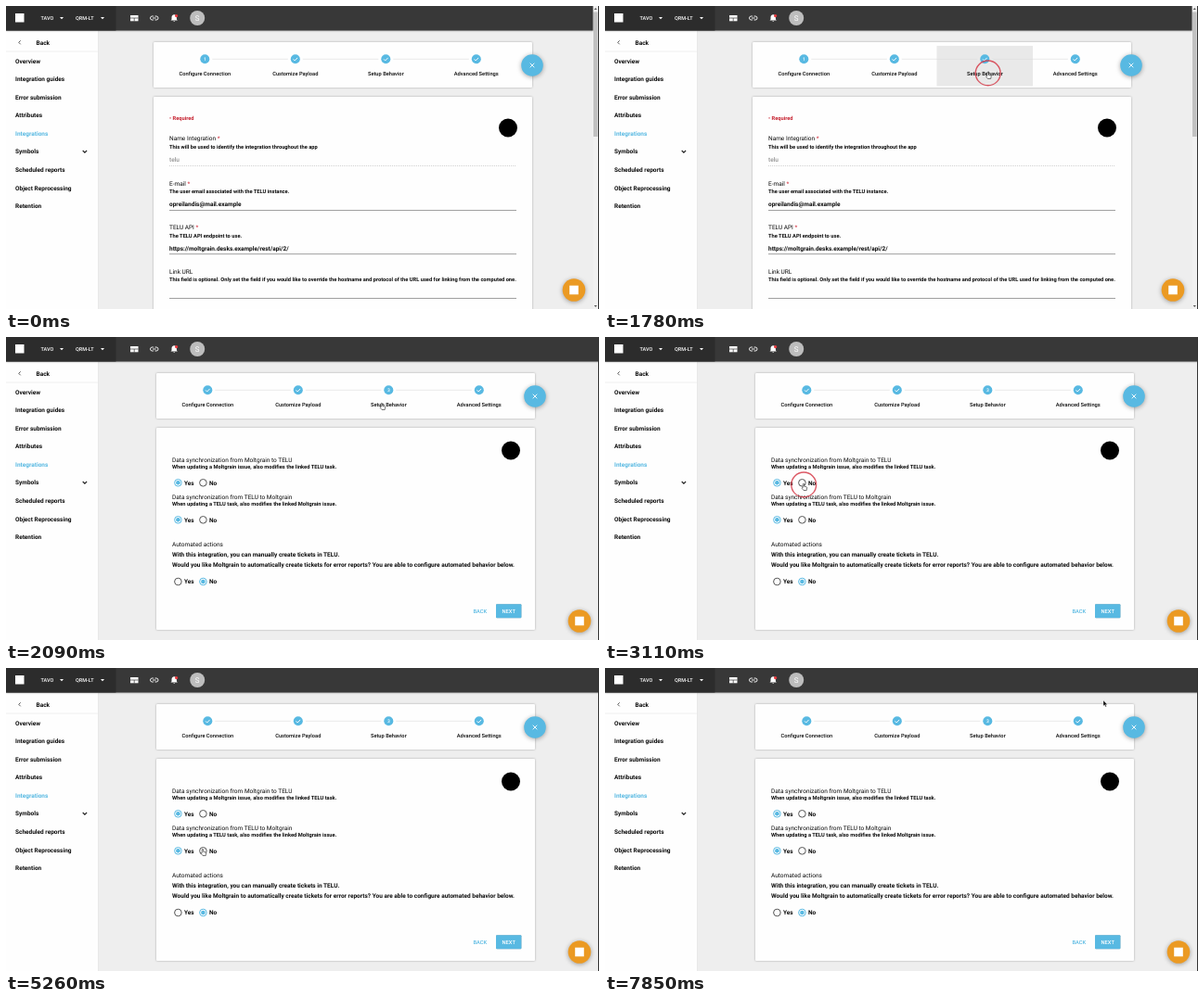
An HTML page for the animation above (8 s loop, 639 by 327 pixels).

```html
<!DOCTYPE html>
<html lang="en">
<head>
<meta charset="utf-8">
<title>Integration settings</title>
<style>
  html, body { margin: 0; width: 100%; height: 100%; overflow: hidden; background: #eee; }
  svg { display: block; width: 100%; height: 100%; }
  text { font-family: Roboto, Arial, sans-serif; font-size: 6.5px; fill: #0c0c0c; text-rendering: geometricPrecision; }
  .b { font-weight: 700; }
  .m { font-weight: 500; }
  .s { font-size: 5.72px; }
  .card { fill: #fefefe; filter: drop-shadow(0 .6px 1.2px rgba(0, 0, 0, .3)); }
  .float { filter: drop-shadow(0 1.2px 2.6px rgba(0, 0, 0, .35)); }
</style>
</head>
<body>
<svg id="stage" viewBox="0 0 639 327" xmlns="http://www.w3.org/2000/svg"></svg>
<script>
const LOOP = 8000;
const BLUE = '#58b9e2', RED = '#d3303f';

const text = (x, y, s, cls = '', extra = '') => `<text x="${x}" y="${y}" class="${cls}" ${extra}>${s}</text>`;
const rect = (x, y, w, h, fill, extra = '') => `<rect x="${x}" y="${y}" width="${w}" height="${h}" fill="${fill}" ${extra}/>`;
const disc = (x, y, r, fill, extra = '') => `<circle cx="${x}" cy="${y}" r="${r}" fill="${fill}" ${extra}/>`;
const line = (d, color, w = 1, extra = '') => `<path d="${d}" fill="none" stroke="${color}" stroke-width="${w}" ${extra}/>`;
const mid = 'text-anchor="middle"';

function header() {
  const caret = x => `<path d="M${x - 2} 12h4l-2 2.3z" fill="#fff"/>`;
  return rect(0, 0, 639, 26.5, '#383838', 'style="filter:drop-shadow(0 .5px .8px rgba(0,0,0,.4))"') +
    rect(0, 0, 118.5, 26.5, '#2c2c2c') +
    rect(10, 8, 9.5, 9.5, '#fff') +
    text(37.5, 15, 'TAVO', 'm', 'style="font-size:5.5px;fill:#fff"') + caret(60) +
    text(75, 15, 'QRM-LT', 'm', 'style="font-size:5.5px;fill:#fff"') + caret(104) +
    rect(134, 10, 8.5, 6.3, '#fff') + line('M134 13h8.5M138.2 13v3.5', '#383838', .7) +
    line('M159 11h-1.5a2 2 0 0 0 0 4h1.5M160.5 11h1.5a2 2 0 0 1 0 4h-1.5M158 13h3.6', '#fff', .9) +
    '<path d="M177.5 15.6l1-1v-2.4q0-2.6 2.7-2.9q2.7.3 2.7 2.9v2.4l1 1zM180.2 16.2h2q-1 1.6-2 0z" fill="#fff"/>' +
    disc(183.6, 10.6, 1.6, '#e8383d') +
    disc(206.2, 13, 8, '#bdbdbd') + text(206.2, 15.9, 'S', '', mid + ' style="font-size:8px;fill:#fff"');
}

function sidebar() {
  const items = ['Overview', 'Integration guides', 'Error submission', 'Attributes', 'Integrations',
    'Symbols', 'Scheduled reports', 'Object Reprocessing', 'Retention'];
  return rect(0, 26, 99, 301, '#fefefe') + rect(99, 26, .5, 301, '#e2e2e2') + rect(0, 48.8, 99, .5, '#e2e2e2') +
    line('M15.7 37.3l-2 2 2 2', '#333', .8) + text(32.5, 41.6, 'Back', 'b') +
    items.map((s, i) => text(10, 61.5 + i * 19.58, s, 'b', i === 4 ? `style="fill:${BLUE}"` : '')).join('') +
    line('M82.7 156l2.2 2.2 2.2-2.2', '#222', 1.1);
}

function stepper() {
  const labels = ['Configure Connection', 'Customize Payload', 'Setup Behavior', 'Advanced Settings'];
  let out = '<rect class="card" x="159" y="39" width="408" height="49" rx="1"/>' +
    '<clipPath id="tab"><rect x="357.5" y="43" width="103.5" height="43.5"/></clipPath>' +
    '<circle id="ripple" cx="411.5" cy="72" fill="#e9e9e9" clip-path="url(#tab)"/>';
  labels.forEach((s, i) => {
    const x = 214.3 + i * 97.5;
    if (i < 3) out += line(`M${x + 8} 57.3h81.5`, '#d8d8d8', .6);
    out += disc(x, 57.3, 5, BLUE) +
      `<g id="check${i}">${line(`M${x - 2.2} 57.4l1.6 1.6 2.9-3.1`, '#fff', .9)}</g>` +
      text(x, 59.1, i + 1, 'm', `id="num${i}" ${mid} style="font-size:5px;fill:#fff"`) +
      text(x, 74.7, s, 'm s', mid);
  });
  return out;
}

const closeButton = () => disc(567, 64, 11.8, BLUE, 'class="float"') +
  line('M564.7 61.7l4.6 4.6m0-4.6l-4.6 4.6', '#fff', .9);

function connectionPage() {
  const field = (y, name, hint, star) =>
    text(176, y, name + (star ? ` <tspan fill="${RED}">*</tspan>` : '')) + text(176, y + 8.6, hint, 'b s');
  const rule = y => line(`M176 ${y}h374`, '#969696', .9);
  return '<rect class="card" x="159" y="98" width="408" height="240" rx="1"/>' +
    disc(541, 131.5, 10, '#000') +
    text(176, 123, '• Required', 'b s', 'style="fill:#c62230"') +
    field(145.4, 'Name Integration', 'This will be used to identify the integration throughout the app', true) +
    text(176, 168.2, 'telu', 'm', 'style="fill:#929292"') +
    line('M176 172.5h374', '#b4b4b4', .6, 'stroke-dasharray="1 1"') +
    field(193.6, 'E-mail', 'The user email associated with the TELU instance.', true) +
    text(176, 216.2, 'opreilandis@mail.example', 'b') + rule(220.5) +
    field(241, 'TELU API', 'The TELU API endpoint to use.', true) +
    text(176, 263.5, 'https://moltgrain.desks.example/rest/api/2/', 'b') + rule(267.7) +
    field(288.6, 'Link URL', 'This field is optional. Only set the field if you would like to override the hostname ' +
      'and protocol of the URL used for linking from the computed one.') + rule(315.5);
}

function behaviorPage() {
  const radio = (x, y, id, label) =>
    disc(x, y, 3.8, 'none', `id="${id}" stroke-width="1"`) + disc(x, y, 2.3, BLUE, `id="${id}Dot"`) +
    text(x + 6.6, y + 2.4, label, 'b');
  const pair = (y, row) => radio(182.4, y, 'yes' + row, 'Yes') + radio(209.4, y, 'no' + row, 'No');
  return '<rect class="card" x="159" y="98" width="408" height="218" rx="1"/>' +
    disc(541, 122.5, 10, '#000') +
    text(176, 134.8, 'Data synchronization from Moltgrain to TELU') +
    text(176, 141.8, 'When updating a Moltgrain issue, also modifies the linked TELU task.', 'b s') + pair(157.3, 0) +
    text(176, 174.8, 'Data synchronization from TELU to Moltgrain') +
    text(176, 181.8, 'When updating a TELU task, also modifies the linked Moltgrain issue.', 'b s') + pair(197.3, 1) +
    text(176, 226, 'Automated actions') +
    text(176, 237, 'With this integration, you can manually create tickets in TELU.', 'b') +
    text(176, 248, 'Would you like Moltgrain to automatically create tickets for error reports? ' +
      'You are able to configure automated behavior below.', 'b') + pair(264, 2) +
    text(507.8, 297.7, 'BACK', 'm s', `${mid} style="fill:${BLUE}"`) +
    rect(525, 288.2, 27.4, 15, BLUE, 'rx="1" style="filter:drop-shadow(0 .5px .7px rgba(0,0,0,.3))"') +
    text(538.7, 297.7, 'NEXT', 'm s', `${mid} style="fill:#fff"`);
}

const scrollbar = () => rect(632.6, 0, 5.4, 327, '#f1f1f1') + rect(633, 6.5, 4.6, 134.5, '#c1c1c1') +
  '<path d="M633.7 4h3.2l-1.6-2zM633.7 323h3.2l-1.6 2z" fill="#555"/>';

const chat = () => disc(612, 306.5, 12.3, '#eb9a23', 'class="float"') + rect(607.2, 301.7, 9.6, 9.6, '#fff');

const cursor = () =>
  '<path id="arrow" d="M0 0v6l1.4-1.2 1 2.1 1-.5-1-2h1.9z" fill="#111" stroke="#fff" stroke-width=".3"/>' +
  '<path id="hand" d="M1.2 4.6V1a.7.7 0 0 1 1.4 0v2.2l2.4.5q.7.2.7.9l-.5 2.9H2L.1 5.2q.2-.9 1.1-.6z" ' +
  'fill="#fff" stroke="#222" stroke-width=".6"/>';

document.getElementById('stage').innerHTML =
  rect(0, 0, 639, 327, '#eee') +
  `<g id="content">${stepper()}<g id="pageA">${connectionPage()}</g><g id="pageB">${behaviorPage()}</g>${closeButton()}</g>` +
  sidebar() + header() + `<g id="scroll">${scrollbar()}</g><g id="chat">${chat()}</g>` + rect(638, 0, 1, 327, '#333') +
  `<g id="cursor">${cursor()}</g>` +
  disc(0, 0, 13.4, 'none', `id="ring" stroke="${RED}" stroke-width="1.4" stroke-opacity=".8"`);

const $ = id => document.getElementById(id);
const show = (id, on) => $(id).setAttribute('display', on ? 'inline' : 'none');
const shift = (id, x, y = 0) => $(id).setAttribute('transform', `translate(${x} ${y})`);
const within = (t, a, b) => t >= a && t < b;

// Pointer moves: first step, last step, number of steps, x, y
const moves = [
  [400, 780, 4, 448, 91], [920, 1050, 2, 410.5, 71], [1930, 1930, 1, 403, 71],
  [2280, 2800, 5, 199, 164], [2940, 2940, 1, 212, 158], [4020, 4020, 1, 183, 160],
  [4180, 4180, 1, 187, 155.5], [4740, 5260, 5, 210, 195], [5780, 6040, 3, 183, 195],
  [7020, 7280, 3, 256, 149], [7450, 7450, 1, 265, 143], [7590, 7850, 3, 537, 35]
];
const clicks = [[1050, 1930], [3110, 3350], [4180, 4590], [5390, 5520], [6220, 6870]];

function pointer(t) {
  let x = 500, y = 124;
  for (const [a, b, n, tx, ty] of moves) {
    if (t < a) break;
    const step = t >= b ? n : Math.floor((t - a) / (b - a) * (n - 1) + 1.02);
    x += (tx - x) * step / n;
    y += (ty - y) * step / n;
  }
  return [x, y];
}

function setRadio(row, yes, grow = 1) {
  for (const [id, on] of [['yes' + row, yes], ['no' + row, !yes]]) {
    $(id).setAttribute('stroke', on ? BLUE : '#555');
    $(id + 'Dot').setAttribute('r', on ? 2.3 * grow : 0);
  }
}

function draw(t) {
  const second = t >= 1930;
  show('pageA', !second);
  show('pageB', second);
  show('scroll', !second);
  shift('content', second ? 3 : 0);
  shift('chat', second ? 6 : 0);
  for (let i = 0; i < 4; i++) {
    const active = i === (second ? 2 : 0);
    show('num' + i, active);
    show('check' + i, !active);
  }
  $('ripple').setAttribute('r', within(t, 1630, 1780) ? 46.5 : within(t, 1780, 2090) ? 80 : 0);

  setRadio(0, !within(t, 3350, 4590), within(t, 3350, 3480) ? .6 : 1);
  setRadio(1, !within(t, 5520, 6870), within(t, 5520, 5650) ? .6 : 1);
  setRadio(2, false);

  const [x, y] = pointer(t);
  const hand = within(t, 1050, 2280) || within(t, 2940, 7020);
  show('cursor', t >= 400);
  show('hand', hand);
  show('arrow', !hand);
  shift('cursor', x, y);
  show('ring', clicks.some(([a, b]) => within(t, a, b)));
  shift('ring', x + 2.2, y + 1.4);
}

const start = performance.now();
function tick() {
  draw((performance.now() - start) % LOOP);
  requestAnimationFrame(tick);
}
draw(0);
requestAnimationFrame(tick);
</script>
</body>
</html>
```
